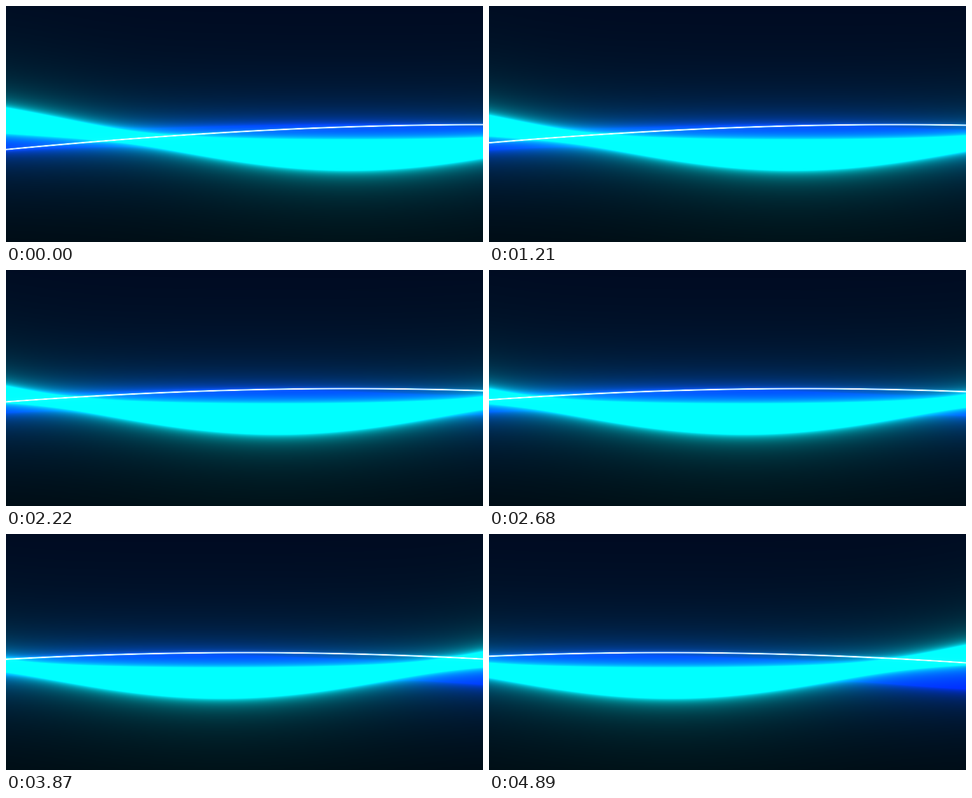
Animation of 750 by 373 pixels, one loop 4.94 s. Source, as an HTML page with a canvas:

```html
<!DOCTYPE html>
<html lang="en">
<head>
<meta charset="utf-8">
<title>Light waves</title>
<style>
  html, body { margin: 0; width: 100%; height: 100%; overflow: hidden; background: #000c20; }
  canvas { display: block; width: 100%; height: 100%; }
</style>
</head>
<body>
<canvas id="stage" width="750" height="373"></canvas>
<script>
const LOOP = 4940;
const canvas = document.getElementById('stage');
const ctx = canvas.getContext('2d');
const { width: W, height: H } = canvas;
const image = ctx.createImageData(W, H);
const px = image.data;

// Wide cyan band: a drifting centre line with a half width that swells and pinches.
function cyanBand(x, t) {
  const s = x - (540 - 52 * t);
  return { y: 199 + 36 * Math.cos(0.0039 * s), h: Math.hypot(10, 22 * Math.cos(0.0046 * s)) };
}

// Blue band drifting a little faster, deepening with time.
function blueBand(x, t) {
  const c = Math.cos(0.0045 * (x - 510 + 65 * t));
  return { y: 199 + (10 + 1.5 * t) * (1 - c), h: 10.5 - 0.8 * t * c };
}

const whiteLine = (x, t) => 187 + 81 * (1 - Math.cos(0.00136 * (x - 757 + 98 * t)));

// Full inside a band, then fading slowly with the distance from its edge.
const glow = (band, y, reach) => reach / (reach + Math.max(0, Math.abs(y - band.y) - band.h));

function draw(t) {
  for (let x = 0; x < W; x++) {
    const cyan = cyanBand(x, t);
    const blue = blueBand(x, t);
    const line = whiteLine(x, t);
    for (let y = 0; y < H; y++) {
      const c = glow(cyan, y, 8.5);
      const b = glow(blue, y, 10);
      const w = Math.min(1, 0.35 / ((y - line) ** 2 + 0.01));
      const i = (y * W + x) * 4;
      px[i] = 255 * w;
      px[i + 1] = 1 + 255 * (c + w);
      px[i + 2] = 18 - 16 * y / H + 255 * (Math.sqrt(c * c + b * b) + w);
      px[i + 3] = 255;
    }
  }
  ctx.putImageData(image, 0, 0);
}

const start = performance.now();
function tick() {
  draw(((performance.now() - start) % LOOP) / 1000);
  requestAnimationFrame(tick);
}
tick();
</script>
</body>
</html>
```
